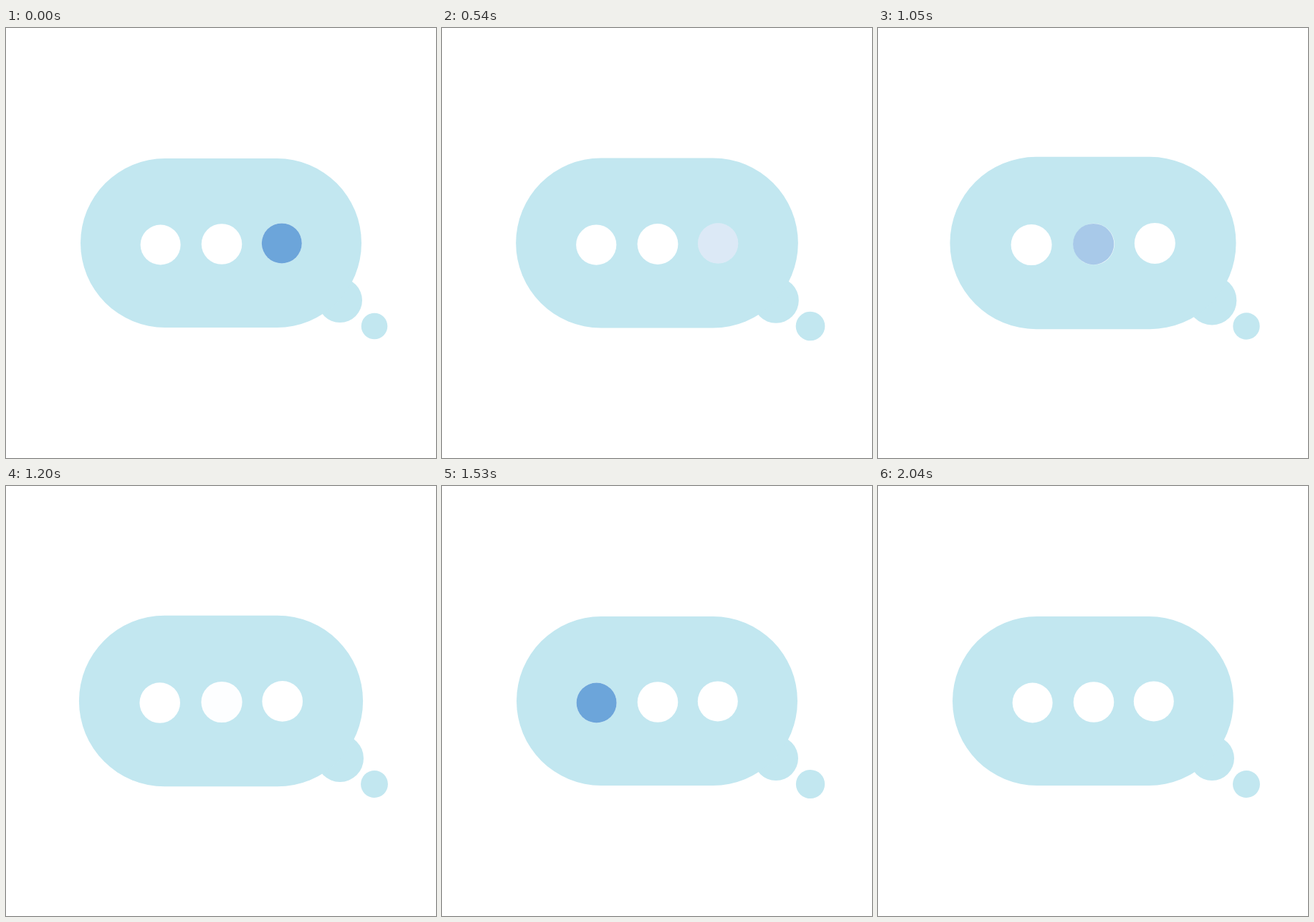
Recreate the animation shown at these times as an HTML page. Size 600 px wide and 600 px high, loop 2.07 s.

```html
<!DOCTYPE html>
<html lang="en">
<head>
<meta charset="utf-8">
<title>Typing bubble</title>
<style>
  html, body { margin: 0; width: 100%; height: 100%; overflow: hidden; background: #fff; }
  svg { display: block; width: 100vw; height: 100vh; }
</style>
</head>
<body>
<svg viewBox="0 0 600 600">
  <g fill="#c2e7f0">
    <circle id="tail" cx="466" cy="380"/>
    <circle id="drop" cx="514" cy="416"/>
  </g>
  <g id="bubble">
    <rect x="104" y="182" width="392" height="236" rx="118" fill="#c2e7f0"/>
    <g fill="#fff">
      <circle cx="215.6" cy="302.5" r="28"/>
      <circle cx="301" cy="301.5" r="28.3"/>
      <circle cx="384.8" cy="300.4" r="28"/>
    </g>
    <g fill="#6ca5da">
      <circle class="glow" cx="384.8" cy="300.4" r="28"/>
      <circle class="glow" cx="300.7" cy="301.5" r="28.1"/>
      <circle class="glow" cx="215.6" cy="302.5" r="28"/>
    </g>
  </g>
</svg>
<script>
const LOOP = 2070, TICK = 30;
const STEP = 602, HOLD = 342;            // each dot: sudden blue, hold, fade to white
const SWELL_PEAK = 930, SWELL_HALF = 560;
const DROP_KEYS = [[0, 18.3], [640, 20.7], [1085, 18.5], [1690, 20.7], [2070, 18.8]];

const [bubble, tail, drop] = ["bubble", "tail", "drop"].map(id => document.getElementById(id));
const glows = document.querySelectorAll(".glow");

function lerpKeys(keys, t) {
  const i = keys.findIndex(k => k[0] > t);
  const [t0, a] = keys[i - 1], [t1, b] = keys[i];
  return a + (b - a) * (t - t0) / (t1 - t0);
}

function swell(t) {
  const d = Math.min(1, Math.abs(t - SWELL_PEAK) / SWELL_HALF);
  return (1 + Math.cos(Math.PI * d)) / 2;
}

function glow(t) {
  if (t < 0 || t >= STEP) return 0;
  return Math.min(1, (STEP - t) / (STEP - HOLD));
}

function draw(t) {
  const s = swell(t);
  bubble.setAttribute("transform", `translate(300 300) scale(${1 + 0.0204 * s}) translate(-300 -300)`);
  tail.setAttribute("r", 31 + 3.8 * s);
  drop.setAttribute("r", lerpKeys(DROP_KEYS, t));
  glows.forEach((dot, i) => dot.setAttribute("opacity", glow(t - i * STEP)));
}

const start = performance.now();
function loop() {
  const t = (performance.now() - start) % LOOP;
  draw(Math.floor(t / TICK) * TICK);
  requestAnimationFrame(loop);
}
loop();
</script>
</body>
</html>
```
